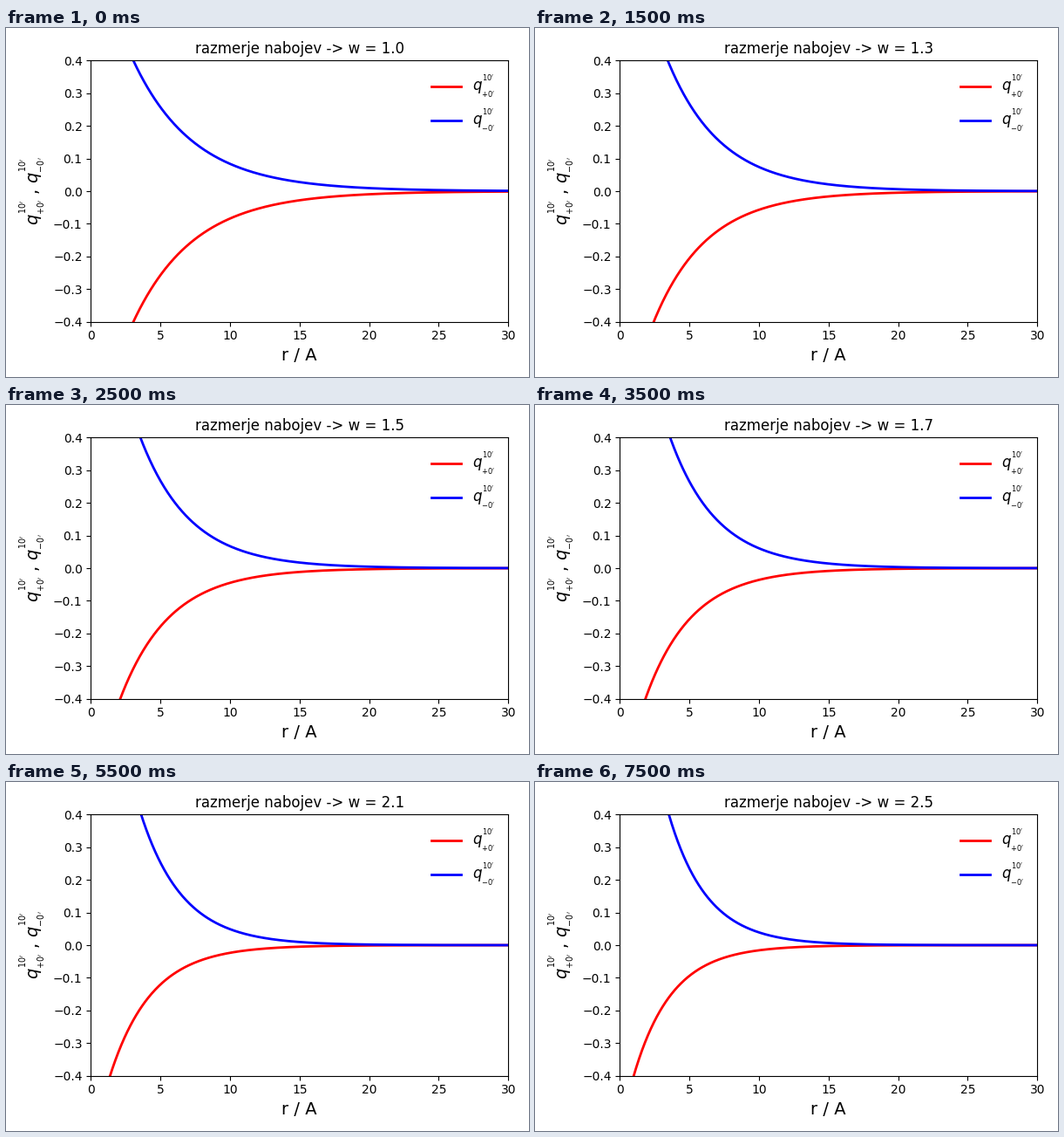
Animation of 600x400 px, one loop 8 s. Source, as a matplotlib script:

```python
import numpy as np
import matplotlib.pyplot as plt
from matplotlib.animation import FuncAnimation

plt.rcParams["font.family"] = "DejaVu Sans"

FRAMES = 16
INTERVAL = 500

Q_PLUS = r"$q_{_{+0'}}^{^{10'}}$"
Q_MINUS = r"$q_{_{-0'}}^{^{10'}}$"

r = np.linspace(0.1, 30, 700)


def profile(w):
    """Screened charge around the ion for charge ratio w."""
    d = w - 1
    amp = (1.614 + 0.469 * d - 0.134 * d**2) / (1 + w)
    kappa = 0.2305 * np.sqrt(w)
    return amp * np.exp(-kappa * r + 0.0004 * r**2)


fig, ax = plt.subplots(figsize=(6, 4), dpi=100)
plus, = ax.plot(r, -profile(1.0), color="#ff0000", lw=2, label=Q_PLUS)
minus, = ax.plot(r, profile(1.0), color="#0000ff", lw=2, label=Q_MINUS)

ax.set_xlim(0, 30)
ax.set_ylim(-0.4, 0.4)
ax.set_xlabel("r / A", fontsize=14)
ax.set_ylabel(f"{Q_PLUS} , {Q_MINUS}", fontsize=14)
title = ax.set_title("razmerje nabojev -> w = 1.0", fontsize=12)
ax.legend(loc="upper right", fontsize=12, frameon=False)
fig.tight_layout()


def update(i):
    w = 1 + 0.1 * i
    q = profile(w)
    plus.set_ydata(-q)
    minus.set_ydata(w * q)
    title.set_text(f"razmerje nabojev -> w = {w:.1f}")
    return plus, minus, title


anim = FuncAnimation(fig, update, frames=FRAMES, interval=INTERVAL,
                     repeat=True, repeat_delay=0, blit=False)
plt.show()
```
